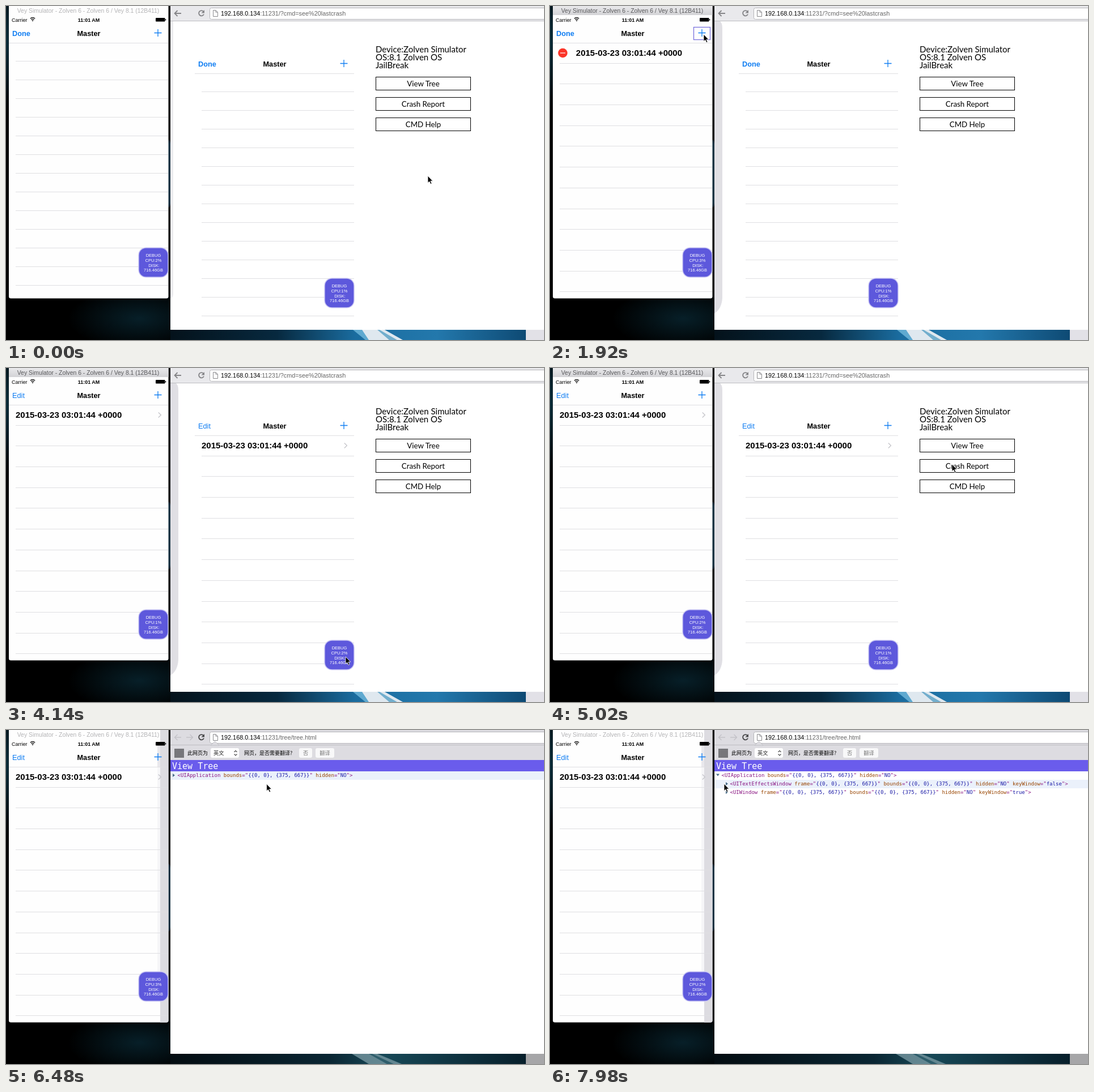
Recreate the animation shown at these times as an HTML page. Size 949 px wide and 590 px high, loop 8000 ms.

```html
<!DOCTYPE html>
<html lang="en">
<head>
<meta charset="utf-8">
<title>Remote view inspector</title>
<style>
  html, body { margin: 0; width: 100%; height: 100%; overflow: hidden; background: #000; }
  svg { display: block; width: 949px; height: 590px; }
  text { font-family: "Liberation Sans", Arial, sans-serif; white-space: pre; }
  .geo { font-family: Lato, sans-serif; }
  .mono { font-family: "DejaVu Sans Mono", monospace; }
  .cjk { font-family: "Noto Sans CJK SC", "Noto Sans CJK", "Noto Sans CJK JP", sans-serif; }
  .b { font-weight: bold; }
  .mid { text-anchor: middle; }
  .off { display: none; }
  .tag { fill: #881280; }
  .name { fill: #994500; }
  .val { fill: #1a1aa6; }
</style>
</head>
<body>
<svg id="stage" viewBox="0 0 949 590" xmlns="http://www.w3.org/2000/svg"></svg>
<script>
const STEP = 147.75, LOOP = 8000;
const BLUE = '#0f7df2', LINE = '#dfdfe2', PANEL = '#dddce1';

const text = (x, y, s, size, fill = '#000', cls = '', id = '') =>
  `<text x="${x}" y="${y}" font-size="${size}" fill="${fill}" class="${cls}"${id && ` id="${id}"`}>${s}</text>`;
const rect = (x, y, w, h, fill, more = '') =>
  `<rect x="${x}" y="${y}" width="${w}" height="${h}" fill="${fill}" ${more}/>`;
const path = (d, stroke, width = 1, more = '') =>
  `<path d="${d}" fill="none" stroke="${stroke}" stroke-width="${width}" ${more}/>`;
const group = (id, body, more = '') => `<g id="${id}" ${more}>${body}</g>`;
const rules = (y, gap, count) => path(
  Array.from({ length: count }, (_, i) => `M17 ${Math.round(y + gap * i) + .5}H286`).join(''), LINE);

function desktop() {
  return `<defs>
    <radialGradient id="haze"><stop offset="0" stop-color="#0b303e"/><stop offset="1" stop-color="#0b303e" stop-opacity="0"/></radialGradient>
    <linearGradient id="sky"><stop offset="0" stop-color="#04121b"/><stop offset=".3" stop-color="#07293f"/>
      <stop offset=".52" stop-color="#1a6c9f"/><stop offset=".75" stop-color="#2378ac"/><stop offset="1" stop-color="#0e4a74"/></linearGradient>
    <linearGradient id="dim"><stop offset="0" stop-color="#030c11"/><stop offset=".45" stop-color="#0a2633"/>
      <stop offset=".6" stop-color="#174857"/><stop offset="1" stop-color="#071f2b"/></linearGradient>
    <linearGradient id="bar" x2="0" y2="1"><stop offset="0" stop-color="#e9e9eb"/><stop offset="1" stop-color="#d3d3d6"/></linearGradient>
    <clipPath id="phoneClip"><path d="M5 0H286.500V513Q286.500 516.500 283 516.500H8.500Q5 516.500 5 513Z"/></clipPath>
  </defs>`
  + rect(0, 0, 949, 590, '#000')
  + '<ellipse cx="235" cy="552" rx="125" ry="55" fill="url(#haze)" opacity=".65"/>'
  + '<ellipse cx="2" cy="60" rx="8" ry="130" fill="url(#haze)"/>'
  + '<ellipse cx="288" cy="296" rx="4" ry="60" fill="#2b6685" opacity=".5"/>'
  + group('bright', rect(290, 572, 627, 18, 'url(#sky)')
    + '<path d="M612 572H628L645 590H634Z" fill="#5fa9d0"/>'
    + '<path d="M628 572H668L700 590H640Z" fill="#dfe8ef"/>'
    + '<path d="M655 572H659L690 590H676Z" fill="#72aecd"/>'
    + rect(917, 572, 32, 18, '#e2e1e7'))
  + group('dark', rect(290, 572, 627, 18, 'url(#dim)')
    + '<path d="M610 572H655L698 590H640Z" fill="#7c9da6" opacity=".75"/>'
    + '<path d="M640 572H646L684 590H672Z" fill="#2e5d6b"/>'
    + rect(917, 572, 32, 18, '#a6a6a8'));
}

// One device screen; p prefixes the ids so it can be drawn twice.
function screen(p) {
  const badge = rect(234, 427, 52, 52, '#5d58dc', 'rx="13" stroke="#c8c5f3" stroke-width="1.5"')
    + text(260, 442.5, 'DEBUG', 7.5, '#fff', 'mid')
    + text(260, 451.5, '', 7.5, '#fff', 'mid', p + 'cpu')
    + text(261, 460.5, 'DISK:', 7.5, '#fff', 'mid')
    + text(260, 469.4, '716.46GB', 7.5, '#fff', 'mid');
  return path('M5 65.500H286', LINE)
    + group(p + 'empty', rules(97, 33, 13))
    + group(p + 'filled', rules(100.6, 36.7, 12)
      + group(p + 'del', '<circle cx="22.500" cy="83" r="8.300" fill="#fb3529"/>' + path('M18 83H27', '#fff', 1.2))
      + group(p + 'date', text(0, 88.4, '2015-03-23 03:01:44 +0000', 15, '#000', 'b'))
      + path('M268.800 78.500L273.300 83L268.800 87.500', '#c7c7cc', 1.4, `id="${p}chev"`))
    + text(146, 52.5, 'Master', 12.75, '#000', 'b mid')
    + text(11, 52.5, '', 12.75, BLUE, '', p + 'edit')
    + path('M261.500 47.500H274.500M268 41V54', BLUE, 1.3)
    + badge;
}

function phone() {
  const title = 'Vey Simulator - Zolven 6 - Zolven 6 / Vey 8.1 (12B411)';
  return `<g clip-path="url(#phoneClip)">`
    + rect(5, 0, 282, 517, '#fefefe')
    + rect(5, 0, 282, 16, 'url(#bar)', 'id="titleBar"')
    + group('ghost', rect(272, 0, 15, 517, PANEL) + rect(267, 24, 5, 41, '#e9e8ec') + rect(267, 65, 5, 362, '#f6f6f8'))
    + text(145, 12, title, 10.4, '#b4b4b6', 'mid', 'title')
    + text(10, 27.5, 'Carrier', 9)
    + path('M42.800 22.300Q47 18.600 51.200 22.300M44.500 24.200Q47 22 49.500 24.200', '#000', 1.2)
    + '<path d="M45.500 25.500Q47 24.400 48.500 25.500L47 27.300Z"/>'
    + text(146, 27.5, '11:01 AM', 9, '#000', 'b mid')
    + rect(264, 21, 16.5, 6.5, '#000', 'rx="1"') + rect(281, 23, 1.2, 2.5, '#000')
    + screen('l')
    + rect(11.5, 37.5, 31, 22, 'none', 'id="tapEdit" stroke="#7a72dd" stroke-width="1.300"')
    + rect(253.5, 37.5, 29, 22, 'none', 'id="tapAdd" stroke="#7a72dd" stroke-width="1.300"')
    + '</g>';
}

function toolbar() {
  const arrow = (x, dir) => `M${x + dir * 6} 13H${x - dir * 5.5}M${x - dir * .5} 8L${x - dir * 5.5} 13L${x - dir * .5} 18`;
  return rect(290, 0, 659, 26.5, PANEL, 'id="chrome"')
    + path('M290 26.500H949', '#bdbdc1')
    + rect(359.5, 3.5, 600, 20, '#fff', 'rx="3" stroke="#b4b4b8"')
    + path(arrow(303, 1), '#777', 1.8, 'id="back"')
    + path(arrow(324, -1), '#c3c2c8', 1.4, 'id="next"')
    + path('M348.300 9.800A4.600 4.600 0 1 0 349 14.500', '#777', 1.9, 'id="reload"')
    + '<path id="tip" d="M350 7V12.500H344.500Z" fill="#777"/>'
    + '<path d="M365.500 7.500H370L373.500 11V18.500H365.500ZM370 7.500V11H373.500" fill="#fff" stroke="#8b8b8e"/>'
    + text(379, 17.3, '', 10.85, '#000', '', 'url');
}

function home() {
  const info = ['Device:Zolven Simulator', 'OS:8.1 Zolven OS', 'JailBreak'];
  const buttons = ['View Tree', 'Crash Report', 'CMD Help'];
  return group('home',
    '<path id="thin" d="M290 27H295V508Q295 515 290 516Z" fill="#ececef"/>'
    + '<path id="wide" d="M290 27H300Q304 30 304 40V515Q303 535 290 543Z" fill="#e0dfe4"/>'
    + group('mirror', screen('r'), 'transform="translate(328 54)"')
    + info.map((s, i) => text(652, 82 + 14.2 * i, s, 15, '#000', 'geo')).join('')
    + buttons.map((s, i) => rect(652.5, 125.5 + 36 * i, 167, 23, '#fff', 'stroke="#000"')
      + text(736, 141.5 + 36 * i, s, 13.3, '#000', 'geo mid')).join('')
    + group('status', rect(290, 559.5, 251.5, 13, '#fafafa', 'stroke="#dadadc"')
      + text(293, 568.8, '192.168.0.134:11231/tree/tree.html', 9, '#a8a8aa')));
}

function node(x, y, tag, attrs) {
  const body = Object.entries(attrs).map(([k, v]) =>
    ` <tspan class="name">${k}</tspan>="<tspan class="val">${v}</tspan>"`).join('');
  return text(x, y, `&lt;${tag}${body}&gt;`, 9, '#881280', 'mono');
}

function tree() {
  const box = '{{0, 0}, {375, 667}}', closed = (x, y) => `<path d="M${x} ${y - 3}V${y + 3}L${x + 4} ${y}Z" fill="#4c6e88"/>`;
  const win = keyWindow => ({ frame: box, bounds: box, hidden: 'NO', keyWindow });
  const button = (x, w, s) => rect(x, 32, w, 17, '#f8f8f9', 'rx="3"') + text(x + w / 2, 44.3, s, 9.2, '#777', 'cjk mid');
  return group('tree',
    rect(290, 27, 659, 26, PANEL)
    + '<path d="M361 27L368.500 20L376 27Z" fill="#dddce1" stroke="#b4b4b8" stroke-width=".7"/>'
    + rect(297, 33, 17, 16, '#77777b')
    + text(320, 44.3, '此网页为', 9, '#000', 'cjk')
    + rect(361, 32, 50, 17, '#fff', 'rx="3"') + text(366, 44.3, '英文', 9.2, '#222', 'cjk')
    + path('M402.500 39L405 36.500L407.500 39M402.500 42.500L405 45L407.500 42.500', '#444', 1.1)
    + text(420, 44.3, '网页，是否需要翻译?', 9, '#000', 'cjk')
    + button(517, 23, '否') + button(546, 33, '翻译')
    + rect(290, 53, 659, 20, '#6a5cec')
    + text(293, 68.5, 'View Tree', 15, '#fff', 'mono', 'heading')
    + rect(290, 73, 659, 15, '#ebf1fb', 'id="hover"')
    + node(302.5, 83, 'UIApplication', { bounds: box, hidden: 'NO' })
    + group('shut', closed(294, 80))
    + group('open', '<path d="M293 77.500H299L296 81.500Z" fill="#4c6e88"/>'
      + closed(310, 95) + node(317.5, 98, 'UITextEffectsWindow', win('false'))
      + closed(310, 110) + node(317.5, 113, 'UIWindow', win('true'))));
}

const pointers = group('pointer',
  '<path id="arrow" d="M0 0V12.500L2.800 10L5 14.600L7 13.600L4.900 9.200H8.800Z" fill="#000" stroke="#fff" stroke-width=".8"/>'
  + '<path id="hand" d="M-1 1Q0 -.8 1.300 1L2.300 5Q3.500 4 4.500 5.300Q6 4.400 6.700 5.900Q8.600 5.300 8.700 7.500V10L7.500 14H1.500Q-.5 11.500 -3 8.500Q-3 6.800 -1.200 7.500L.2 8.500Z" fill="#fff" stroke="#000" stroke-width="1"/>');

document.getElementById('stage').innerHTML =
  desktop() + phone() + rect(290, 0, 659, 572, '#fff') + toolbar() + home() + tree() + pointers;

const $ = id => document.getElementById(id);
const show = (id, on) => $(id).classList.toggle('off', !on);
const set = (id, key, value) => $(id).setAttribute(key, value);
const clamp = v => Math.min(1, Math.max(0, v));

// [step, x, y]
const route = [[0, 744, 300], [2, 735, 285], [7, 285, 62], [9, 271, 50], [18, 271, 50], [19, 140, 50],
  [20, 30, 44], [21, 24, 42], [23, 24, 42], [25, 640, 505], [26, 655, 521], [28, 599, 510], [30, 599, 510],
  [33, 700, 190], [35, 718, 150], [37, 719, 136], [42, 719, 136], [45, 330, 75], [47, 293, 77], [51, 293, 77], [54, 307, 95]];
const cpuLeft = [[0, 2], [4, 3], [17, 1], [34, 2], [44, 3], [54, 2]];
const cpuRight = [[0, 1], [26, 2], [32, 1]];
const latest = (list, n) => list.filter(e => e[0] <= n).pop()[1];

function pointerAt(n) {
  const i = Math.max(1, route.findIndex(r => r[0] >= n));
  const [a, b] = [route[i - 1], route[i]], k = clamp((n - a[0]) / (b[0] - a[0]));
  return [a[1] + (b[1] - a[1]) * k, a[2] + (b[2] - a[2]) * k];
}

function drawScreen(p, added, done, cpu) {
  show(p + 'empty', added === 0);
  show(p + 'filled', added > 0);
  set(p + 'date', 'opacity', added);
  set(p + 'del', 'opacity', Math.min(added, 1 - done));
  set(p + 'chev', 'opacity', done);
  set(p + 'date', 'transform', `translate(${45.8 - 28.8 * done} 0)`);
  $(p + 'edit').textContent = done ? 'Edit' : 'Done';
  $(p + 'edit').classList.toggle('b', !done);
  $(p + 'cpu').textContent = `CPU:${cpu}%`;
}

function draw(n) {
  const front = n >= 10 && n < 36, web = n >= 36, loaded = n >= 43;
  const tapped = n >= 21 && n < 27, ink = web ? '#48484a' : '#858588';

  drawScreen('l', clamp((n - 10) / 3), clamp((n - 21) / 3), latest(cpuLeft, n));
  drawScreen('r', n >= 14 ? 1 : 0, n >= 25 ? 1 : 0, latest(cpuRight, n));
  set('ledit', 'fill', n === 21 ? '#dcdce0' : BLUE);
  show('tapAdd', n >= 10 && n < 17);
  show('tapEdit', tapped);

  show('titleBar', front);
  set('title', 'fill', front ? '#59595c' : '#b4b4b6');
  show('ghost', web);
  show('bright', !web);
  show('dark', web);

  set('chrome', 'fill', web ? PANEL : '#e9e9ec');
  set('back', 'stroke', loaded ? '#c3c2c8' : ink);
  set('back', 'stroke-width', loaded ? 1.4 : 1.8);
  set('reload', 'stroke', ink);
  set('tip', 'fill', ink);
  show('next', web);
  const rest = loaded ? '/tree/tree.html' : '/?cmd=see%20lastcrash';
  $('url').innerHTML = `192.168.0.134<tspan fill="#666">:11231${rest}</tspan>`;

  show('home', !loaded);
  show('thin', n < 12);
  show('wide', n >= 12 && !web);
  show('status', n >= 39);
  set('status', 'opacity', clamp((n - 38) / 4));
  show('tree', loaded);
  show('shut', n < 50);
  show('open', n >= 50);
  set('hover', 'y', n < 53 ? 73 : 88);

  const [x, y] = pointerAt(n), hand = web && !loaded;
  set('pointer', 'transform', `translate(${x.toFixed(1)} ${y.toFixed(1)})`);
  show('hand', hand);
  show('arrow', !hand);
}

const start = performance.now();
let last = -1;
function tick() {
  const t = Math.max(0, performance.now() - start) % LOOP;
  const n = Math.min(54, Math.floor(t / STEP + .15));
  if (n !== last) draw(last = n);
  requestAnimationFrame(tick);
}
tick();
</script>
</body>
</html>
```
